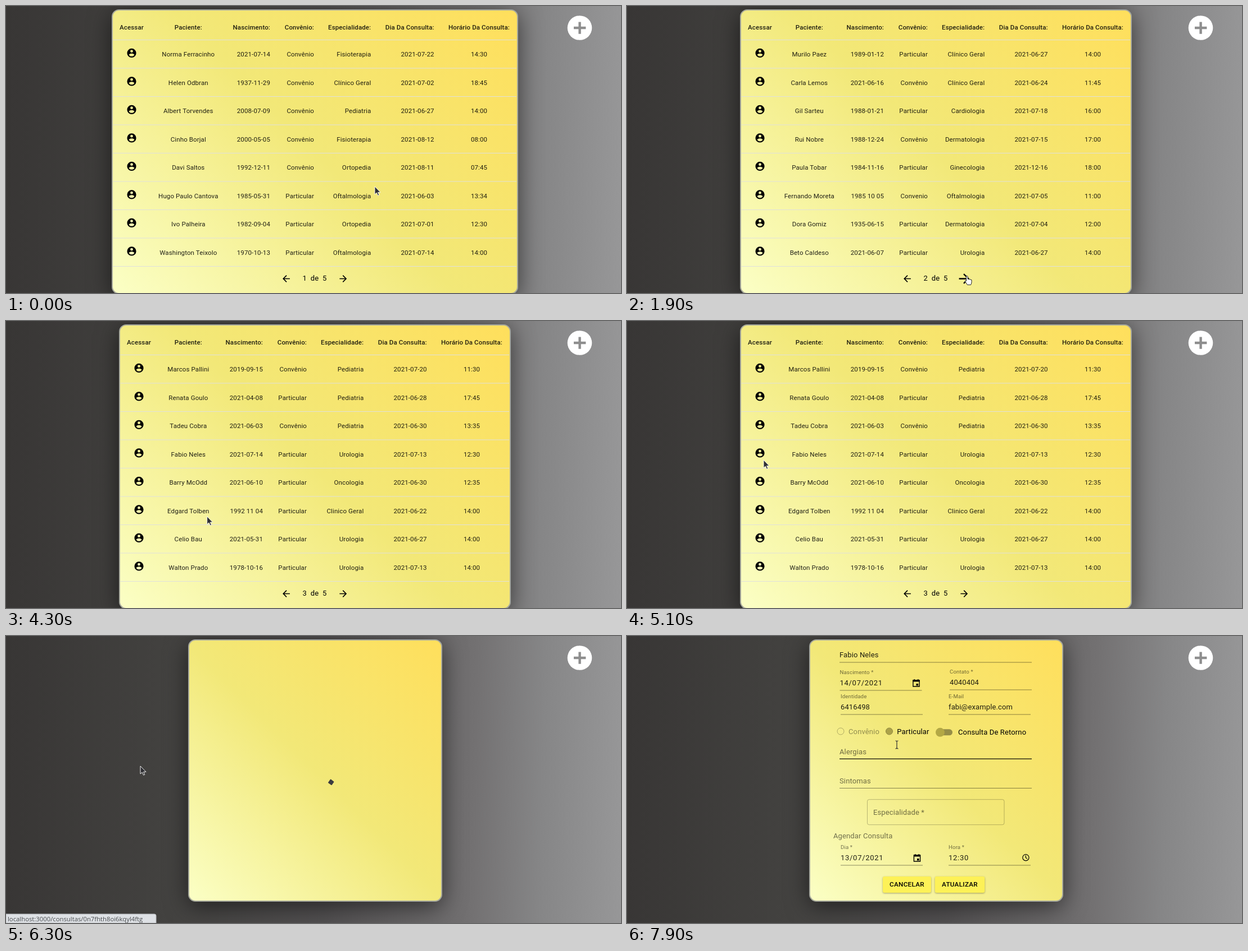
Write an HTML page that moves like this. It is 1094 by 512 pixels and loops after 8000 ms.

```html
<!DOCTYPE html>
<html lang="pt">
<head>
<meta charset="utf-8">
<title>Consultas</title>
<style>
html, body { margin: 0; width: 100%; height: 100%; overflow: hidden }
body {
  position: relative;
  background: linear-gradient(91deg, #383635, #434240 27%, #525051 52%, #737172 76%, #868687 87%, #979798);
}
#card {
  position: absolute; top: 6px; box-sizing: border-box;
  border: 2.5px solid #a6a89c; border-radius: 13px;
  background: linear-gradient(45deg, #fbffc6, #f2e878 50%, #ffdf5c) border-box;
  box-shadow: 0 8px 40px rgba(0, 0, 0, .55);
}
svg { position: absolute; left: 0; top: 0; width: 1094px; height: 512px }
text { font: 13px Roboto, sans-serif; letter-spacing: .01em; fill: rgba(0, 0, 0, .87); white-space: pre }
.cell { font-size: 11.5px }
.head { font-size: 11.5px; font-weight: 500 }
.label { font-size: 9.7px; fill: rgba(0, 0, 0, .54) }
.date { letter-spacing: .055em }
.hint { fill: rgba(0, 0, 0, .54) }
.off { fill: rgba(0, 0, 0, .4) }
.black { fill: #000 }
.button { font-size: 11.7px; font-weight: 500; letter-spacing: .025em; fill: #000 }
.url { font: 11.3px "Open Sans", sans-serif; letter-spacing: 0; fill: #4a4d50 }
.line { stroke: rgba(0, 0, 0, .45); fill: none }
</style>
</head>
<body>
<div id="card"></div>
<svg viewBox="0 0 1094 512">
  <circle cx="1020.5" cy="39" r="21.8" fill="#fff"/>
  <path d="M1010 39h21.4M1020.6 28.4v21.4" stroke="#8e8e8e" stroke-width="4.4"/>
  <g id="pages"></g>
  <g id="pager">
    <path id="back" transform="translate(498.5 486.5) scale(-.8 .8)"/>
    <path id="next"/>
    <text id="count" class="black" y="490" text-anchor="middle" x="549"></text>
  </g>
  <rect id="cube" x="31.5" y="-4" width="8" height="8" rx="1" fill="#3b3b40"/>
  <g id="form"></g>
  <g id="status">
    <path d="M0 496h264q3 0 3 3v13H0z" fill="#dee1e5" stroke="#b5b8bc"/>
    <text class="url" x="3" y="508.5">localhost:3000/consultas/0n7fhth8oi6kqyl4ftg</text>
  </g>
  <g id="cursor">
    <path d="M0 0V14L3.3 11.2 5.6 16.2 7.8 15.2 5.6 10.4H10z" fill="#2e2e33" stroke="#fff" stroke-width=".9"/>
    <path d="M2.5 1.2q1.5-1.4 2.6.2V6q4 .2 6.9 1.7v4.1q-.3 2.4-1.4 4.6H4.4Q2.6 13 .2 10.2q.4-1.6 2.3-.6z" fill="#fff" stroke="#222"/>
    <path d="M-2.5 0Q0 0 0 1.4 0 0 2.5 0M0 1.4V12.6M-2.5 14Q0 14 0 12.6 0 14 2.5 14" fill="none" stroke="#333" stroke-width="1.2"/>
  </g>
</svg>
<script>
const $ = id => document.getElementById(id);
const show = (node, on) => node.style.display = on ? '' : 'none';
const text = (x, y, str, cls = '', anchor = 'start') =>
  `<text x="${x}" y="${y}" class="${cls}" text-anchor="${anchor}">${str}</text>`;
const line = (x1, x2, y) => `<path class="line" d="M${x1} ${y}H${x2}"/>`;

const PERSON = 'M12 2a10 10 0 100 20 10 10 0 000-20zm0 3a3 3 0 110 6 3 3 0 010-6zm0 14.2c-2.5 0-4.71-1.28-6-3.22.03-1.99 4-3.08 6-3.08s5.97 1.09 6 3.08c-1.29 1.94-3.5 3.22-6 3.22z';
const ARROW = 'M0-8l-1.41 1.41L4.17-1H-8v2H4.17l-5.58 5.59L0 8l8-8z';
const HEADS = 'Acessar|Paciente:|Nascimento:|Convênio:|Especialidade:|Dia Da Consulta:|Horário Da Consulta:'.split('|');
const ANCHORS = ['middle', 'middle', 'end', 'end', 'end', 'end', 'middle'];

// One row per line: patient, birth, plan, specialty, day, hour
const PAGES = [`
Norma Ferracinho|2021-07-14|Convênio|Fisioterapia|2021-07-22|14:30
Helen Odbran|1937-11-29|Convênio|Clínico Geral|2021-07-02|18:45
Albert Torvendes|2008-07-09|Convênio|Pediatria|2021-06-27|14:00
Cinho Borjal|2000-05-05|Convênio|Fisioterapia|2021-08-12|08:00
Davi Saltos|1992-12-11|Convênio|Ortopedia|2021-08-11|07:45
Hugo Paulo Cantova|1985-05-31|Particular|Oftalmologia|2021-06-03|13:34
Ivo Palheira|1982-09-04|Particular|Ortopedia|2021-07-01|12:30
Washington Teixolo|1970-10-13|Particular|Oftalmologia|2021-07-14|14:00`, `
Murilo Paez|1989-01-12|Particular|Clínico Geral|2021-06-27|14:00
Carla Lemos|2021-06-16|Convênio|Clínico Geral|2021-06-24|11:45
Gil Sarteu|1988-01-21|Particular|Cardiologia|2021-07-18|16:00
Rui Nobre|1988-12-24|Convênio|Dermatologia|2021-07-15|17:00
Paula Tobar|1984-11-16|Particular|Ginecologia|2021-12-16|18:00
Fernando Moreta|1985 10 05|Convenio|Oftalmologia|2021-07-05|11:00
Dora Gomiz|1935-06-15|Particular|Dermatologia|2021-07-04|12:00
Beto Caldeso|2021-06-07|Particular|Urologia|2021-06-27|14:00`, `
Marcos Pallini|2019-09-15|Convênio|Pediatria|2021-07-20|11:30
Renata Goulo|2021-04-08|Particular|Pediatria|2021-06-28|17:45
Tadeu Cobra|2021-06-03|Convênio|Pediatria|2021-06-30|13:35
Fabio Neles|2021-07-14|Particular|Urologia|2021-07-13|12:30
Barry McOdd|2021-06-10|Particular|Oncologia|2021-06-30|12:35
Edgard Tolben|1992 11 04|Particular|Clinico Geral|2021-06-22|14:00
Celio Bau|2021-05-31|Particular|Urologia|2021-06-27|14:00
Walton Prado|1978-10-16|Particular|Urologia|2021-07-13|14:00`];

function pageMarkup(rows, index) {
  const inset = index ? 13 : 0;
  const columns = [223.5 + inset, 324.3, ...[470, 548, 649.3, 761.7, 841.5].map(x => x - inset)];
  const cells = (list, first, y, cls) => list.map((s, i) =>
    text(columns[i + first], y, s, cls, ANCHORS[i + first])).join('');
  const body = rows.trim().split('\n').map((row, i) => {
    const y = 60.5 + 50.5 * i;
    return `<path d="M${190.5 + inset} ${y}H${908 - inset}" stroke="#e0e0dc"/>
      <path d="${PERSON}" fill-rule="evenodd" transform="translate(${columns[0] - 9.7} ${y + 13.7}) scale(.81)"/>`
      + cells(row.split('|'), 1, y + 29.8, 'cell');
  }).join('');
  return `<g>${cells(HEADS, 0, 41.5, 'head')}${body}<path d="M${190.5 + inset} 464.5H${908 - inset}" stroke="#e0e0dc"/></g>`;
}

const field = (x, y, label, value, cls) =>
  text(x, y - 20.5, label, 'label') + text(x, y, value, cls) + line(x, x + 146, y + 9);
const calendar = (x, y) => `<path d="M${x - 5.6} ${y - 5}h11.2v11h-11.2zM${x - 3.2} ${y - 7}v2M${x + 3.2} ${y - 7}v2"
  fill="none" stroke="#000" stroke-width="1.4"/><path d="M${x - 6} ${y - 5.5}h12v3h-12zM${x} ${y + 1}h3.6v3.4h-3.6z"/>`;
const button = (x, width, label) => `<rect x="${x}" y="429" width="${width}" height="29" rx="3.2" fill="#fdf157"
  style="filter:drop-shadow(0 1.6px 1.6px rgba(0,0,0,.35))"/>` + text(x + width / 2, 447, label, 'button', 'middle');

$('pages').innerHTML = PAGES.map(pageMarkup).join('');
$('back').setAttribute('d', ARROW);
$('next').setAttribute('d', ARROW);
$('form').innerHTML =
  text(378, 38.3, 'Fabio Neles') + line(378, 720, 47)
  + field(378.5, 88, 'Nascimento *', '14/07/2021', 'date') + calendar(514.5, 84)
  + field(574, 87, 'Contato *', '4040404')
  + field(380, 131, 'Identidade', '6416498')
  + field(572, 131, 'E-Mail', 'fabi@example.com')
  + `<circle cx="380" cy="170" r="6" fill="none" stroke="rgba(0,0,0,.27)"/>
     <circle cx="466.5" cy="170" r="6" fill="#aca249" stroke="#8f873f"/>
     <rect x="554" y="166.3" width="25" height="11" rx="5.5" fill="#968e47"/>
     <circle cx="557" cy="171.8" r="8" fill="#b3a845"/>`
  + text(394, 174.5, 'Convênio', 'off') + text(480.3, 174.5, 'Particular', 'black')
  + text(589, 176, 'Consulta De Retorno', 'black')
  + text(378, 211, 'Alergias', 'hint') + '<path id="allergy" d="M378 219.2H720"/>'
  + text(378, 263, 'Sintomas', 'hint') + line(378, 720, 271.5)
  + '<rect id="select" x="427.5" y="291.7" width="243.5" height="45" rx="3.2" fill="none"/>'
  + text(438, 318.5, 'Especialidade *', 'hint')
  + text(367, 361, 'Agendar Consulta', 'hint')
  + field(380, 400, 'Dia *', '13/07/2021', 'date') + calendar(516, 396)
  + field(572, 400, 'Hora *', '12:30', 'date')
  + '<path d="M709.3 391.5v4l2.6 1.7M715 395.3a5.6 5.6 0 10-11.2 0 5.6 5.6 0 1011.2 0" fill="none" stroke="#000" stroke-width="1.2"/>'
  + button(455, 86, 'CANCELAR') + button(547.7, 88.6, 'ATUALIZAR');

// Cursor path: time, x, y
const PATH = [[0, 656, 322], [100, 656, 322], [300, 546, 416], [400, 553, 432], [500, 553, 432], [1200, 601, 481],
  [3800, 601, 481], [4100, 394, 373], [4200, 394, 373], [4500, 285, 300], [4600, 285, 300], [5100, 243, 248],
  [5300, 239, 232], [6300, 239, 232], [6700, 402, 292], [7100, 402, 292], [7600, 455, 306], [7700, 455, 306],
  [7900, 480, 187], [8000, 480, 187]];

function cursorAt(t) {
  const i = PATH.findIndex(key => key[0] > t);
  const [t0, x0, y0] = PATH[i - 1], [t1, x1, y1] = PATH[i];
  const k = (t - t0) / (t1 - t0);
  return [x0 + (x1 - x0) * k, y0 + (y1 - y0) * k];
}

function draw(now) {
  const t = Math.floor(now % 8000 / 100) * 100;
  const page = t < 1900 ? 0 : t < 3400 ? 1 : 2;
  const listing = t < 6300, filled = t >= 6900;
  const onNext = t >= 1100 && t < 3900, onSelect = t >= 7400 && t < 7800, onAllergy = t >= 7900;

  const [left, width, height] = !listing ? [323.5, 452, 468] : page ? [200.5, 697, 508] : [187.5, 723, 508];
  Object.assign($('card').style, { left: left + 'px', width: width + 'px', height: height + 'px' });
  [...$('pages').children].forEach((node, i) => show(node, listing && i === page));
  show($('pager'), listing);
  $('count').textContent = `${page + 1}  de  5`;
  $('next').setAttribute('transform', `translate(599.8 486.5) scale(${onNext ? 1.15 : .8})`);

  show($('cube'), !listing && !filled);
  $('cube').setAttribute('transform', `translate(549.5 240) rotate(${36 + (t - 6300) * .3})`);

  show($('form'), filled);
  $('select').setAttribute('stroke', `rgba(0,0,0,${onSelect ? .87 : .25})`);
  $('allergy').setAttribute('stroke', `rgba(0,0,0,${onAllergy ? .8 : .45})`);
  $('allergy').setAttribute('stroke-width', onAllergy ? 1.6 : 1);

  show($('status'), t >= 5500 && t < 6600);
  $('status').style.opacity = t < 5600 ? .5 : 1;

  const kind = onNext ? 1 : onSelect || onAllergy ? 2 : 0;
  $('cursor').setAttribute('transform', `translate(${cursorAt(t)})`);
  [...$('cursor').children].forEach((node, i) => show(node, i === kind));
}

function loop() {
  draw(performance.now());
  requestAnimationFrame(loop);
}
loop();
</script>
</body>
</html>
```
